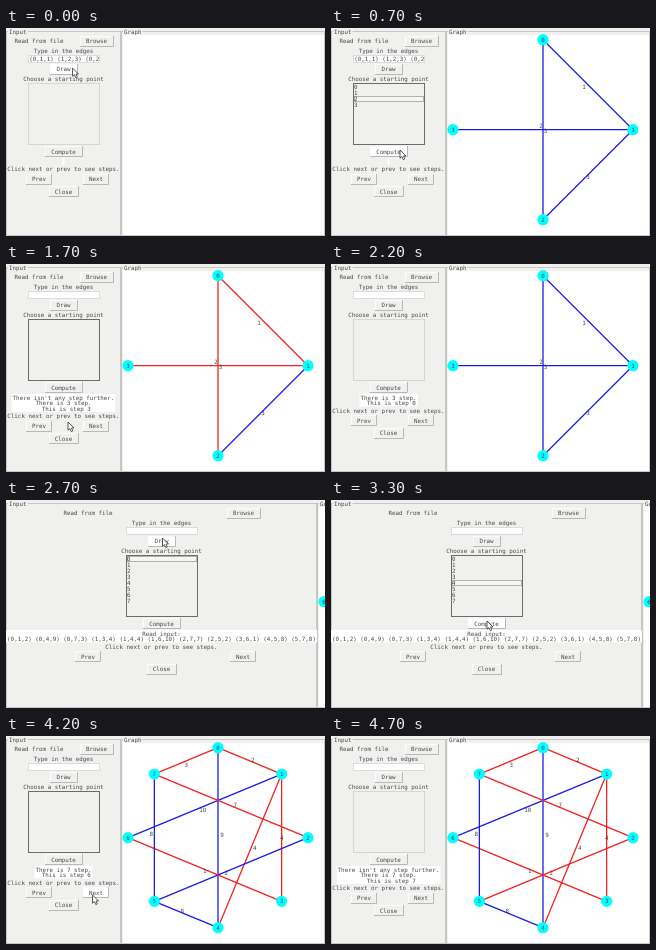
An HTML page that plays this animation: 319x208 px, repeating every 4900 ms.

```html
<!DOCTYPE html>
<html lang="en">
<head>
<meta charset="utf-8">
<title>Spanning tree steps</title>
<style>
  html, body { margin: 0; width: 100%; height: 100%; overflow: hidden; background: #f0f0ee; }
  svg { display: block; width: 319px; height: 208px; }
  text { font: 5.83px "DejaVu Sans Mono", "Liberation Mono", monospace; fill: #484848;
         text-rendering: geometricPrecision; white-space: pre; }
</style>
</head>
<body>
<svg id="stage" viewBox="0 0 319 208"></svg>
<script>
const LOOP = 4900, CHAR = 3.51, NARROW = 115, WIDE = 311;
const BLUE = '#1c1ce4', RED = '#f02222';

// Edges: from, to, weight, label offset x, y. Tree: edge indexes in the order they are added.
const small = {
  nodes: 4, tree: [2, 0, 3],
  edges: [[0, 1, 1, -4, 2], [1, 2, 3, 0, 2], [0, 2, 2, -2, -4], [1, 3, 3, 2.5, 1]]
};
const large = {
  nodes: 8, tree: [4, 0, 2, 3, 8, 6, 7],
  edges: [
    [0, 1, 2, 3, -1], [0, 4, 9, 4, -3], [0, 7, 3, 0, 4], [1, 3, 4, 0, 0],
    [1, 4, 4, 5, -3], [1, 6, 10, -2, 4], [2, 7, 7, 4, -1], [2, 5, 2, -5, 3],
    [3, 6, 1, 0, 1], [4, 5, 8, -4, -4], [5, 7, 8, -3, -4]
  ]
};
const input = ['Read input:', large.edges.map(e => `(${e.slice(0, 3)})`).join(' ')];

// Each step changes only the listed parts of the window.
const steps = [
  [0, { entry: '(0,1,1) (1,2,3) (0,2', cursor: [66.5, 40], items: 0, active: -1, focus: false,
        graph: null, step: 0, label: 'none' }],
  [200, { graph: small, items: 4, active: 0 }],
  [300, { cursor: [67, 46] }],
  [400, { cursor: [60, 62] }],
  [500, { cursor: [56, 70], active: 2, focus: true }],
  [600, { cursor: [63, 98] }],
  [700, { cursor: [69, 122] }],
  [800, { entry: '', items: 0, active: -1, label: 'steps' }],
  [900, { cursor: [76, 134] }],
  [1000, { cursor: [84, 147] }],
  [1100, { cursor: [89, 155] }],
  [1200, { step: 1 }],
  [1400, { step: 2 }],
  [1500, { step: 3 }],
  [1600, { label: 'end' }],
  [1700, { cursor: [62, 158] }],
  [1800, { cursor: [34, 157] }],
  [1900, { step: 2, label: 'steps' }],
  [2000, { step: 1 }],
  [2100, { step: 0 }],
  [2200, { cursor: null, focus: false }],
  [2400, { cursor: [91, 14] }],
  [2500, { label: 'input' }],
  [2600, { cursor: [132, 28] }],
  [2700, { cursor: [156.5, 38], graph: large, items: 8, active: 0, focus: true }],
  [2800, { cursor: [156, 48] }],
  [2900, { cursor: [154, 64] }],
  [3000, { cursor: [153, 82], active: 4 }],
  [3200, { cursor: [154, 104] }],
  [3300, { cursor: [156, 121] }],
  [3400, { items: 0, active: -1, label: 'steps' }],
  [3500, { cursor: [112, 146] }],
  [3600, { cursor: [86.5, 159] }],
  [3700, { step: 1 }],
  [3800, { step: 2 }],
  [3900, { step: 3 }],
  [4000, { step: 4 }],
  [4100, { step: 5 }],
  [4200, { step: 6 }],
  [4300, { step: 7, label: 'end' }],
  [4400, { cursor: [150, 110] }],
  [4500, { cursor: null }],
  [4700, { focus: false }]
];
const states = [];
steps.forEach(([, change], i) => states.push({ ...states[i - 1], ...change }));

const rect = (x, y, w, h, fill, stroke = 'none') =>
  `<rect x="${x}" y="${y}" width="${w}" height="${h}" fill="${fill}" stroke="${stroke}"/>`;
const path = (d, stroke, width = 1, fill = 'none') =>
  `<path d="${d}" fill="${fill}" stroke="${stroke}" stroke-width="${width}"/>`;
const text = (s, x, y, anchor = 'middle') =>
  `<text x="${x}" y="${y + 2}" text-anchor="${anchor}">${s}</text>`;

function button(name, cx, cy, w, cursor) {
  const x = Math.round(cx - w / 2), y = Math.round(cy - 5.5), h = 11;
  const hot = cursor && cursor[0] >= x && cursor[0] <= x + w &&
              cursor[1] >= y && cursor[1] <= y + h;
  return rect(x, y, w, h, hot ? '#ffffff' : '#f0f0ee') +
    path(`M${x + .5} ${y + h - 1}V${y + .5}H${x + w - 1}`, '#fcfcfc') +
    path(`M${x} ${y + h - .5}H${x + w - .5}V${y}`, '#b8b8b6') +
    text(name, cx, cy);
}

function group(title, x, w) {
  return rect(x + .5, 3.5, w - 1, 204, 'none', '#c6c6c4') +
    rect(x + 2, 0, title.length * CHAR + 2, 7, '#f0f0ee') +
    text(title, x + 3, 3.5, 'start');
}

function labelLines({ label, graph, step }) {
  if (label === 'none') return [''];
  if (label === 'input') return input;
  const lines = [`There is ${graph.tree.length} step.`, ` This is step ${step}`];
  return label === 'end' ? ["There isn't any step further.", ...lines] : lines;
}

function panel(s, width, lines) {
  const wide = width === WIDE, mid = wide ? 155.5 : 57.5;
  const left = wide ? 82 : 33, right = wide ? 237 : 90, x = mid - 35.5;
  const drop = (lines.length - 1) * 5.5;
  let out = group('Input', 0, width) +
    text('Read from file', left, 13) + button('Browse', right + .5, 13, 34, s.cursor) +
    text('Type in the edges', mid, 22.8) +
    rect(x + .5, 27.5, 71, 7, '#ffffff', '#dcdcda') + text(s.entry, x + 1.2, 30.8, 'start') +
    button('Draw', mid, 41.3, 28, s.cursor) +
    text('Choose a starting point', mid, 51.3) +
    rect(x + .5, 55.5, 71, 61, '#f0f0ee', s.focus ? '#6c6c6c' : '#d6d6d4');
  if (s.active >= 0) out += rect(x + 1.5, 56.5 + 6 * s.active, 69, 5, '#f6f6f4', '#b0b0ae');
  for (let i = 0; i < s.items; i++) out += text(i, x + 1, 59 + 6 * i, 'start');
  out += button('Compute', mid, 123.5, 38, s.cursor);

  const span = Math.max(...lines.map(l => l.length)) * CHAR + 2;
  out += rect(mid - span / 2, 130, span, 7 + drop, '#ffffff');
  lines.forEach((l, i) => out += text(l, mid + (l[0] === ' ' ? 1 : 0), 133.5 + 5.5 * i));
  return out + text('Click next or prev to see steps.', mid, 141 + drop) +
    button('Prev', left, 151 + drop, 26, s.cursor) +
    button('Next', right, 151 + drop, 26, s.cursor) +
    button('Close', mid, 163.5 + drop, 30, s.cursor);
}

function drawGraph({ graph, step }) {
  if (!graph) return '';
  const at = i => {
    const a = i / graph.nodes * 2 * Math.PI;
    return [212 + 90 * Math.sin(a), 101.7 - 90 * Math.cos(a)];
  };
  const taken = graph.tree.slice(0, step);
  let lines = '', weights = '', nodes = '';
  graph.edges.forEach(([from, to, weight, dx, dy], i) => {
    const [ax, ay] = at(from), [bx, by] = at(to);
    lines += path(`M${ax} ${ay}L${bx} ${by}`, taken.includes(i) ? RED : BLUE, 1.3);
    weights += text(weight, (ax + bx) / 2 + dx, (ay + by) / 2 + dy);
  });
  for (let i = 0; i < graph.nodes; i++) {
    const [x, y] = at(i);
    nodes += `<circle cx="${x}" cy="${y}" r="5.6" fill="#00ffff"/>` + text(i, x, y);
  }
  return lines + nodes + weights;
}

function arrow([x, y]) {
  return `<g transform="translate(${x} ${y})">` +
    path('M0 0V8.2L1.9 6.6 3.3 9.6 4.8 8.9 3.5 6H6Z', '#303030', .8, '#ffffff') + '</g>';
}

function render(s) {
  const width = s.label === 'input' ? WIDE : NARROW;
  return rect(0, 0, 319, 208, '#f0f0ee') + panel(s, width, labelLines(s)) +
    `<g transform="translate(${width - NARROW} 0)">` +
    group('Graph', 115, 204) + rect(117, 7, 201, 200, '#ffffff') + drawGraph(s) + '</g>' +
    (s.cursor ? arrow(s.cursor) : '');
}

const stage = document.getElementById('stage');
const start = performance.now();
let shown = -1;
function tick() {
  const t = (performance.now() - start) % LOOP;
  const now = steps.findLastIndex(([time]) => time <= t);
  if (now !== shown) stage.innerHTML = render(states[shown = now]);
  requestAnimationFrame(tick);
}
tick();
</script>
</body>
</html>
```
